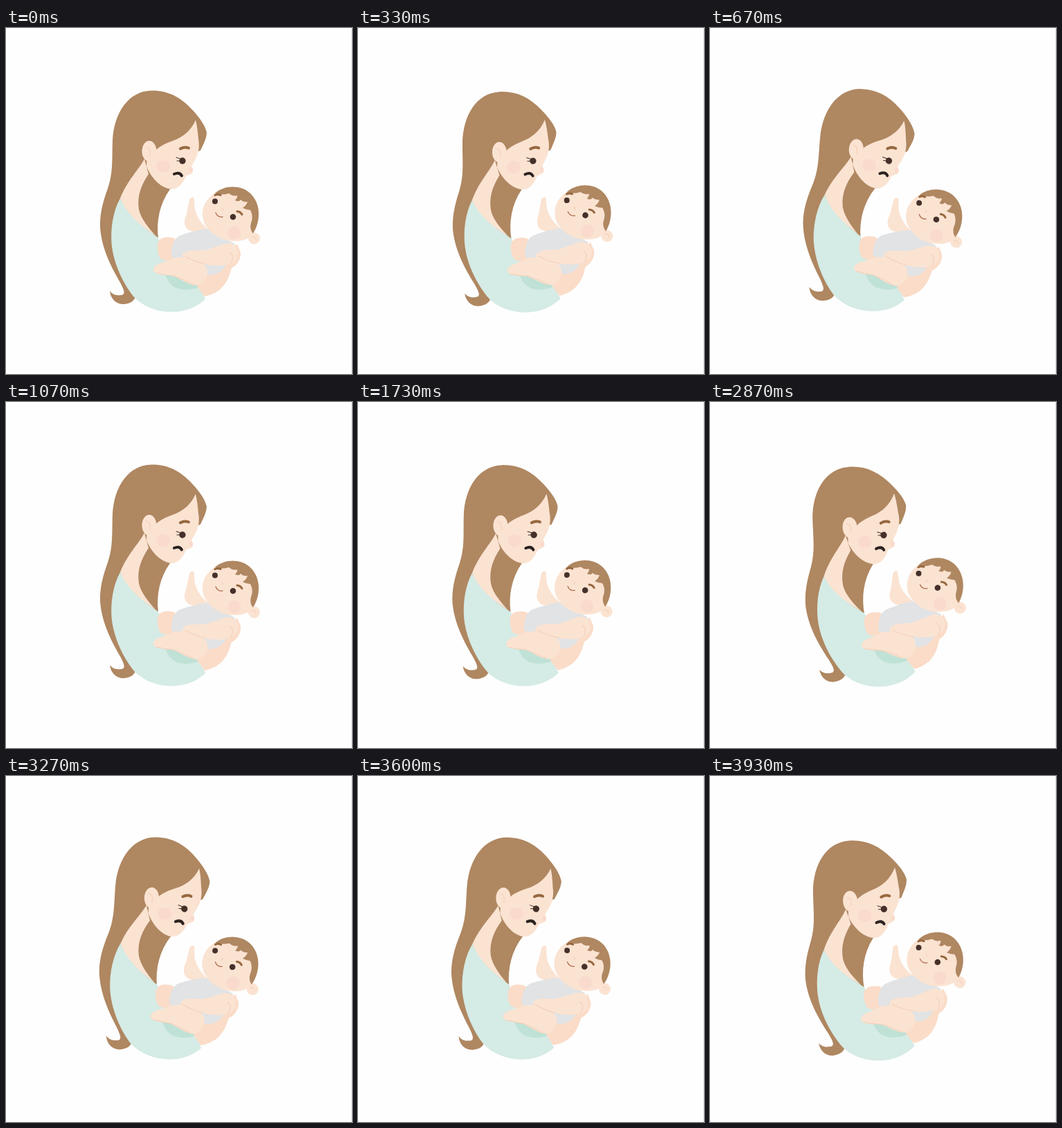
Recreate the animation shown at these times as an HTML page. Size 500 px wide and 500 px high, loop 3.99 s.

```html
<!DOCTYPE html>
<html lang="en">
<head>
<meta charset="utf-8">
<title>Mother rocking a baby</title>
<style>
  html, body { margin: 0; width: 100%; height: 100%; overflow: hidden; background: #fefefe; }
  svg { display: block; width: 100%; height: 100%; }
  .hair { fill: #af8761; }
  .skin { fill: #fbe3d2; }
  .shade { fill: #fadcc8; }
  .dress { fill: #d5ebe5; }
  .fold { fill: #bfe1d6; }
  .suit { fill: #e1e3e5; }
  .blush { fill: #fadacd; }
  .eye { fill: #45302a; }
  .line { fill: none; stroke-linecap: round; stroke-linejoin: round; }
  .brow { stroke: #96683f; }
  .crease { stroke: #f5d1b9; stroke-width: 1.2; }
</style>
</head>
<body>
<svg viewBox="0 0 500 500">
  <rect x="499" width="1" height="500" fill="#e4e4e4"/>
  <g id="pair">
    <!-- mother: hair, neck, dress -->
    <path class="hair" d="M210 90.500C178 91 156 121 154 163C153 190 155 209 147 232C139 254 135.500 270 136 288C138 318 152 345 164 366C171 379 174 386 165 386C158 387 153 384 150 380C151 391 159 400 171 399C180 398 186 394 187 388L200 340L220 304C217 279 222 254 237 233L278 178L281 177C285 168 290 160 290 151C288 141 280 130 270 119C253 100 234 90 210 90.500Z"/>
    <path class="skin" d="M200 189C192 205 176 219 165 246L176 272L216 300C207 290 195 276 192 262C189 242 196 226 206 211Z"/>
    <path class="skin" d="M274 133C267 149 255 158 241 163C230 167 222 171 216 177L204 180L203 200C211 219 225 232 240 233C250 232 256 224 260 214C264 212 269 211 270 208C271 204 267 202 269 198C276 187 281 176 278 160C277 149 276 140 274 133Z"/>
    <ellipse class="skin" cx="207" cy="178" rx="10.5" ry="15"/>
    <path class="line crease" d="M202 172Q210 173 208 185"/>
    <ellipse class="blush" cx="227" cy="200" rx="10" ry="9"/>
    <ellipse class="blush" cx="267" cy="205" rx="3" ry="4"/>
    <path class="line brow" stroke-width="4" d="M252 174.500Q258 171 264 173.500"/>
    <circle class="eye" cx="255" cy="192" r="4.7"/>
    <path class="line" stroke="#45302a" stroke-width="1" d="M252 189L246 187M251 192L247 192"/>
    <path class="line" stroke="#2b2220" stroke-width="4" d="M243 211Q251 207.500 254 213.500"/>
    <path class="dress" d="M165 246C155 264 151 288 152.500 311C155 341 171 373 187 391C203 406 226 412 247 410C266 408 278 401 288 392L277 368L236 340L220 303C204 291 178 276 165 246Z"/>
    <path class="fold" d="M230 355C234 370 244 378 259 378C270 378 278 376 283 371L275 352Z"/>
    <path class="shade" d="M276 373L287 388C297 386 307 381 313 374C322 364 323 355 326 347C334 343 340 334 339 324L334 312L304 340Z"/>

    <!-- baby: body and limbs -->
    <path class="shade" d="M244 304C231 300 221 303 219 312C218 321 220 329 224 334L250 342Z"/>
    <path class="skin" d="M265 248C267 244 272 243 272 248L273 262C276 274 283 283 291 290L283 299L264 292C256 286 257 278 261 268Z"/>
    <path class="suit" d="M239 330C239 315 242 305 251 300C264 295 278 292 291 290C303 298 322 306 331 312L319 340C314 352 305 357 293 357L254 338Z"/>
    <path class="skin" d="M256 326C264 319 276 322 287 321C301 318 313 311 323 311C335 313 338 324 333 334C326 344 308 345 290 342L266 337C259 333 252 330 256 326Z"/>
    <path class="skin" d="M244 332C260 329 281 334 289 345C294 354 290 365 280 371C269 375 253 363 241 358C229 356 217 357 213 351C212 344 219 341 226 339Z"/>
    <path class="line crease" d="M259 330Q272 338 288 341M217 354Q230 357 242 358Q258 364 271 371M323 324Q331 328 325 340"/>

    <!-- baby: head -->
    <circle class="skin" cx="358.500" cy="304" r="8.5"/>
    <path class="skin" d="M304 237C292 244 283 256 284 271C285 288 301 303 320 307C338 310 352 306 357 297C366 284 369 261 358 246C344 229 318 228 304 237Z"/>
    <path class="hair" d="M302 239C315 227 339 226 353 239C368 253 369 278 357 297C352 291 353 284 355 279C357 272 355 267 353 263Q348 263 342 260Q348 256 349 251Q343 252 339 248Q337 252 331 249Q335 245 334 242Q328 244 322 239Q312 242 302 239Z"/>
    <circle class="blush" cx="330" cy="296" r="9.500"/>
    <path class="line crease" d="M355 302Q361 300 361 306M312 260Q315 263 312 264"/>
    <circle class="eye" cx="302" cy="250.500" r="4"/>
    <circle class="eye" cx="328" cy="273" r="4.3"/>
    <path class="line brow" stroke-width="3" d="M302 241.500Q306 239.500 310 241.500M334 265Q339 265.500 341 269.500"/>
    <path class="line" stroke="#ad6b4c" stroke-width="1.3" d="M303 267Q306 274 313 273"/>
  </g>
</svg>
<script>
  const LOOP = 3990, FPS = 15, STEPS = 20;
  const pair = document.getElementById('pair');

  // The loop opens on the upright pose, then sways three times.
  function angle(step) {
    if (step === 0) return 0;
    return 3.8 * Math.cos((step - 11.3) / STEPS * 2 * Math.PI) - 0.4;
  }

  function draw() {
    const time = performance.now() % LOOP;
    const step = Math.floor((time + 4) * FPS / 1000);
    pair.setAttribute('transform', `rotate(${angle(step).toFixed(3)} 258 256)`);
    requestAnimationFrame(draw);
  }
  draw();
</script>
</body>
</html>
```
